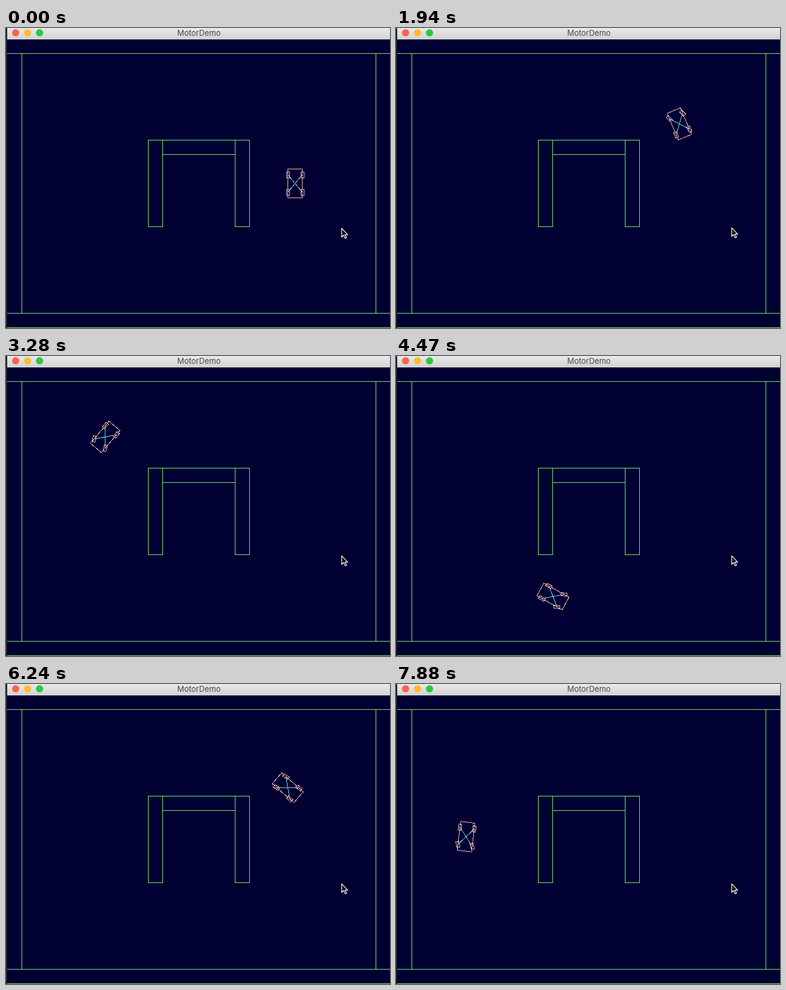
These frames come from a looping animation (641x499 px, 8000 ms). An HTML page:

```html
<!DOCTYPE html>
<html lang="en">
<head>
<meta charset="utf-8">
<title>MotorDemo</title>
<style>
  html, body { margin: 0; width: 100%; height: 100%; overflow: hidden; background: #000032; }
  svg { display: block; width: 641px; height: 499px; }
  .lines { fill: none; stroke-width: 1; shape-rendering: crispEdges; }
  .wall { stroke: #78ea6a; }
  .body { stroke: #f3b5ab; }
  .axle { stroke: #72d6de; }
  text { font: 13px Inter, Roboto, sans-serif; fill: #464646; text-anchor: middle; }
</style>
</head>
<body>
<svg viewBox="0 0 641 499">
  <defs>
    <linearGradient id="bar" x2="0" y2="1">
      <stop stop-color="#e9e9e9"/><stop offset="1" stop-color="#d2d2d2"/>
    </linearGradient>
    <rect id="wheel" x="-2.5" y="-5" width="5" height="10"/>
  </defs>
  <rect width="641" height="499" fill="#000032"/>
  <rect width="2" height="499" fill="#1b1f2b"/>

  <g class="lines">
    <path class="wall" d="M2 42.5H641M2 474.5H641M2 498.5H641M26.5 42V474M617.5 42V474"/>
    <path class="wall" d="M261.5 186V330.5H237.5V186.5H406.5V330.5H382.5V186M261.5 210.5H382.5"/>
    <g id="car">
      <path class="axle" d="M-12-14.5L12 14.5M12-14.5L-12 14.5"/>
      <g class="body">
        <rect x="-12" y="-24" width="24" height="48"/>
        <use href="#wheel" x="-12" y="14.5"/>
        <use href="#wheel" x="12" y="14.5"/>
        <use href="#wheel" id="frontLeft"/>
        <use href="#wheel" id="frontRight"/>
      </g>
    </g>
  </g>

  <path id="cursor" d="M.5.5V14.5L3.7 11.5 6.2 17 8.4 16 6 10.8H10.3Z" fill="#000" stroke="#fff" stroke-width="1.2"/>

  <rect x="2" width="639" height="19" fill="url(#bar)"/>
  <circle cx="16" cy="8" r="6" fill="#ff5f57"/>
  <circle cx="36" cy="8" r="6" fill="#ffbd2e"/>
  <circle cx="56" cy="8" r="6" fill="#28c940"/>
  <text x="322" y="13">MotorDemo</text>
</svg>
<script>
const LOOP = 8000, STEP = 148.6;
const START = 6, ACCELERATION = 4, TOP_SPEED = 39;
const DEGREE = Math.PI / 180;

// Waypoints: step, x, y, heading in degrees clockwise from up.
const route = [
  [START, 482.5, 258.5, 0], [11, 482.5, 208.8, 0], [13, 473, 159.5, -23],
  [16, 393, 111.5, -76], [20, 238, 107, -94], [22, 165.7, 134.6, -140],
  [24, 142, 207.5, 176], [29, 235.5, 371, 147], [30, 262, 400, 119],
  [32, 340.5, 417, 92], [37, 519, 343, 32], [39, 532.5, 266, -14],
  [44, 406.5, 127.5, -59], [46, 331, 109.5, -103], [50, 183.5, 164, -118],
  [53, 117, 254, -173]
].map(([step, x, y, heading]) => {
  const speed = Math.min(TOP_SPEED, ACCELERATION * (step - START) + .01);
  const angle = heading * DEGREE;
  return { step, p: [x, y], v: [speed * Math.sin(angle), -speed * Math.cos(angle)] };
});

// Hermite curve through the waypoints; the car points along its velocity.
function poseAt(time) {
  const step = Math.max(START, time);
  const next = route.findIndex(w => w.step > step);
  const k = next < 0 ? route.length - 2 : next - 1;
  const a = route[k], b = route[k + 1];
  const span = b.step - a.step, u = (step - a.step) / span;
  const [x, y] = [0, 1].map(c =>
    a.p[c] + (b.p[c] - a.p[c]) * u * u * (3 - 2 * u) +
    span * u * (1 - u) * (a.v[c] * (1 - u) - b.v[c] * u));
  const [vx, vy] = [0, 1].map(c =>
    (b.p[c] - a.p[c]) / span * 6 * u * (1 - u) +
    a.v[c] * (1 - u) * (1 - 3 * u) + b.v[c] * u * (3 * u - 2));
  return { x, y, heading: Math.atan2(vx, -vy) / DEGREE };
}

const place = (id, x, y, angle = 0) =>
  document.getElementById(id).setAttribute("transform", `translate(${x} ${y}) rotate(${angle})`);

function draw(now) {
  const step = Math.floor((now % LOOP + 8) / STEP);
  const { x, y, heading } = poseAt(step);
  const turn = poseAt(step + .5).heading - poseAt(step - .5).heading;
  const leftTurn = (turn + 540) % 360 - 180;
  const steer = Math.max(-26, Math.min(0, leftTurn));
  place("car", x, y, heading);
  place("frontLeft", -12, -14.5, steer);
  place("frontRight", 12, -14.5, steer);
  place("cursor", 560, step ? 332 : 333);
}

const start = performance.now();
function tick() {
  draw(performance.now() - start);
  requestAnimationFrame(tick);
}
tick();
</script>
</body>
</html>
```
